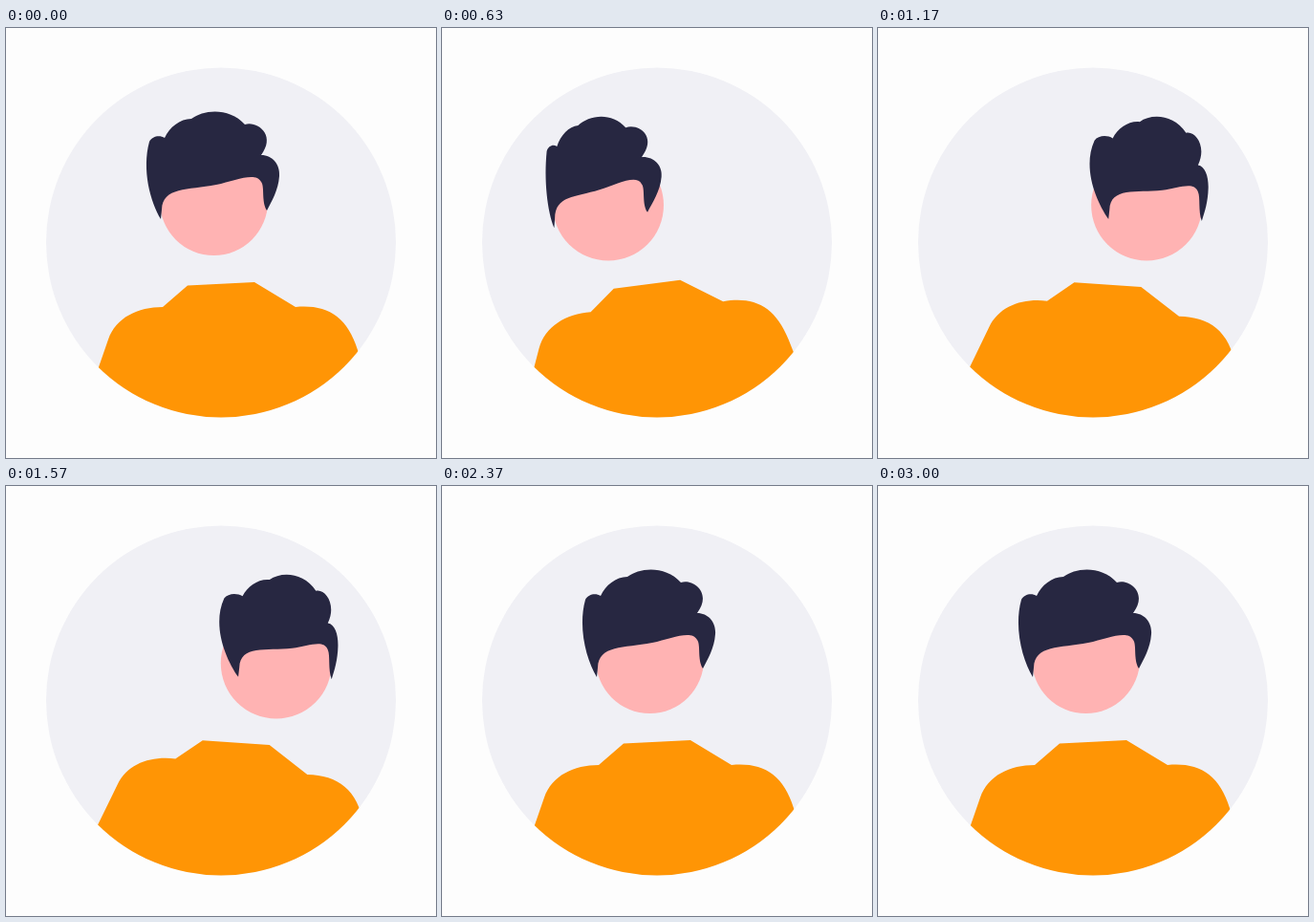
These frames come from a looping animation (450 px wide and 450 px high, 3.03 s). An HTML page:

```html
<!DOCTYPE html>
<html lang="en">
<head>
<meta charset="utf-8">
<title>Looking around</title>
<style>
  html, body { margin: 0; width: 100%; height: 100%; overflow: hidden; background: #fdfdfd; }
  svg { display: block; width: 100vw; height: 100vh; }
</style>
</head>
<body>
<svg viewBox="0 0 450 450">
  <defs><clipPath id="disc"><circle cx="225" cy="224.5" r="183"/></clipPath></defs>
  <circle cx="225" cy="224.5" r="183" fill="#f0f0f5"/>
  <g clip-path="url(#disc)">
    <path id="body" fill="#ff9505" d="M90,375 L107,326 C115,303 138,292 164,292
      L190,269.5 L260,266 L303,292 C335,289 357,301 368,337 L380,376 V460 H70 Z"/>
  </g>
  <circle id="face" fill="#ffb3b3"/>
  <path id="hair" fill="#272741" d="M162,200 C151,182 142,148 150,119 C153,113 161,112 166,115
    C171,104 182,95 194,95 C207,85 234,83 250,101 C263,97 283,112 267,133
    C279,133 287,143 286,155 C285,170 278,181 273,191 C267,182 271,166 267,161
    C261,150 240,160 220,164 C190,170 164,166 163,190 Z"/>
</svg>
<script>
const LOOP = 3030, MOVE = 400;
const body = document.getElementById('body');
const face = document.getElementById('face');
const hair = document.getElementById('hair');
const frontHair = hair.getAttribute('d');
const HEAD = { x: 217.5, y: 181.5, r: 56.5 };
const LEFT = -0.8, RIGHT = 1.2;

// 0 to 1 with an eased start and end, over one move
function ramp(t, start) {
  const p = Math.min(1, Math.max(0, (t - start) / MOVE));
  return p * p * (3 - 2 * p);
}

// Turns a point of the head like a point on a ball, with a slight tilt
function turnPoint(x, y, turn, lean) {
  const dx = x - HEAD.x;
  const depth = 13 * Math.sqrt(Math.max(0, 1 - (dx / 73) ** 2));
  const newX = x + 54.4 * turn + depth * turn - (0.12 * dx + 1) * lean;
  const newY = y + 0.085 * dx * turn + 5.5 * lean;
  return newX.toFixed(2) + ',' + newY.toFixed(2);
}

function draw(t) {
  const back = ramp(t, 4 * MOVE);
  const turn = LEFT * ramp(t, 0) + (RIGHT - LEFT) * ramp(t, 2 * MOVE) - RIGHT * back;
  const lean = ramp(t, 0) - back;

  body.setAttribute('transform', `rotate(${5.7 * turn} 225 400)`);
  face.setAttribute('cx', HEAD.x + 54.4 * turn);
  face.setAttribute('cy', HEAD.y + 4 * lean);
  face.setAttribute('r', HEAD.r + 1.5 * lean);
  hair.setAttribute('d', frontHair.replace(/([\d.]+),([\d.]+)/g,
    (_, x, y) => turnPoint(+x, +y, turn, lean)));
}

const start = performance.now();
function tick() {
  draw((performance.now() - start) % LOOP);
  requestAnimationFrame(tick);
}
draw(0);
requestAnimationFrame(tick);
</script>
</body>
</html>
```
